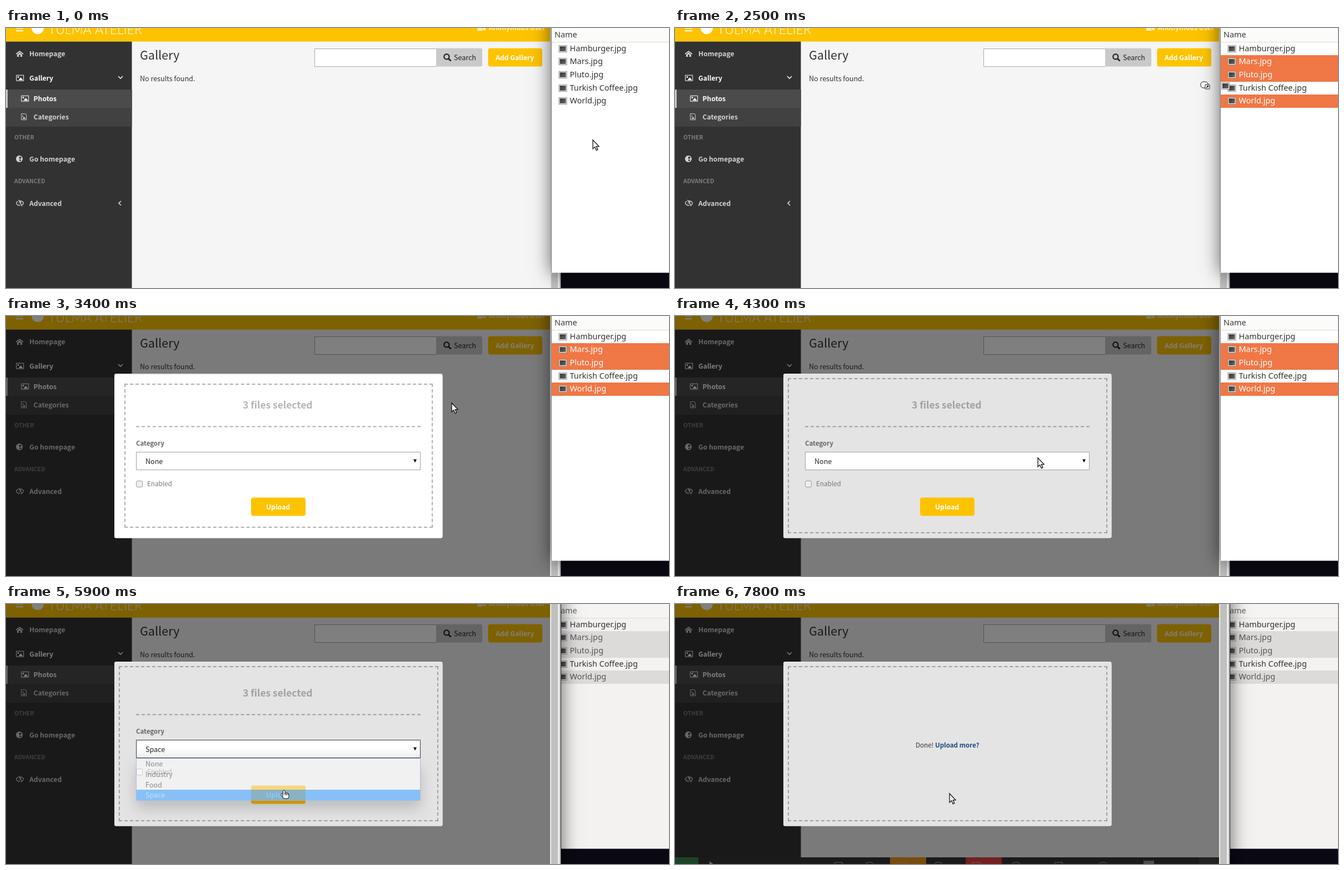
Recreate the animation shown at these times as an HTML page with a canvas. Size 1193 by 469 pixels, loop 8000 ms.

```html
<!DOCTYPE html>
<html lang="en">
<head>
<meta charset="utf-8">
<title>Gallery upload</title>
<style>
html, body { margin: 0; width: 100%; height: 100%; overflow: hidden; }
canvas { display: block; width: 1193px; height: 469px; }
</style>
</head>
<body>
<canvas id="stage" width="1193" height="469"></canvas>
<script>
const g = document.getElementById('stage').getContext('2d');
const LOOP = 8000, STEP = 100;
const UI = '"Noto Sans CJK JP", "Noto Sans CJK SC", "Noto Sans", sans-serif';
const DESKTOP = '"Noto Sans", "Open Sans", sans-serif';
const GOLD = '#fdc300';
const FILES = ['Hamburger', 'Mars', 'Pluto', 'Turkish Coffee', 'World'];
const PICKS = ['Mars', 'Pluto', 'World'];
const PICK_TIME = 600;
const FOCUS_SWITCH = 4500;

const clamp = v => Math.max(0, Math.min(1, v));
const ramp = (t, from, to) => clamp((t - from) / (to - from));
const mix = (a, b, k) => a + (b - a) * k;
const easeOut = k => Math.sin(k * Math.PI / 2);
const grey = v => `rgb(${v},${v},${v})`;
const fileY = i => Math.round(25.6 + i * 23.65);

// Pointer moves: start, end, x, y
const MOVES = [
  ...PICKS.map((name, i) =>
    [i * PICK_TIME, i * PICK_TIME + 500, 1050, fileY(FILES.indexOf(name)) + 7]),
  [1800, 2100, 1039, 80],
  [2300, 2500, 946, 97],
  [2500, 3000, 802, 157],
  [3400, 3600, 700, 215],
  [3800, 4300, 653, 256],
  [4300, 5100, 503, 334],
  [5500, 5700, 499, 336],
  [6300, 6500, 494, 342]
];

function pointerAt(t) {
  let x = 1056, y = 202;
  for (const [from, to, toX, toY] of MOVES) {
    const k = easeOut(ramp(t, from, to));
    x = mix(x, toX, k);
    y = mix(y, toY, k);
  }
  return { x: Math.round(x), y: Math.round(y) };
}

function box(x, y, w, h, color) {
  g.fillStyle = color;
  g.fillRect(x, y, w, h);
}

function round(x, y, w, h, r, fill, stroke) {
  g.beginPath();
  g.roundRect(x, y, w, h, r);
  paint(fill, stroke);
}

function paint(fill, stroke, width = 1) {
  g.lineWidth = width;
  if (fill) { g.fillStyle = fill; g.fill(); }
  if (stroke) { g.strokeStyle = stroke; g.stroke(); }
}

const frame = (x, y, w, h, color) => round(x + .5, y + .5, w - 1, h - 1, 0, null, color);

function disc(x, y, r, fill, stroke, width) {
  g.beginPath();
  g.arc(x, y, r, 0, 7);
  paint(fill, stroke, width);
}

function line(x0, y0, x1, y1, color, width = 1.5) {
  g.beginPath();
  g.moveTo(x0, y0);
  g.lineTo(x1, y1);
  paint(null, color, width);
}

// Dashes spread evenly, with a whole dash at both ends
function dashed(x0, y0, x1, y1, color) {
  const dash = 6, rest = Math.hypot(x1 - x0, y1 - y0) - dash;
  g.setLineDash([dash, rest / Math.round(rest / 10) - dash]);
  line(x0, y0, x1, y1, color, 2);
  g.setLineDash([]);
}

// Triangle or open chevron with its tip turned by the given quarter turns
function wedge(x, y, half, height, turns, fill, stroke) {
  at(x, y, () => {
    g.rotate(turns * Math.PI / 2);
    g.beginPath();
    g.moveTo(-half, height);
    g.lineTo(0, 0);
    g.lineTo(half, height);
    paint(fill, stroke, 1.7);
  });
}

function label(s, x, y, size, color, bold = false) {
  g.font = `${bold ? 700 : 400} ${size / (bold ? 1.15 : 1.117)}px ${UI}`;
  g.fillStyle = color;
  g.fillText(s, x, y);
}

function at(x, y, draw) {
  g.save();
  g.translate(x, y);
  draw();
  g.restore();
}

function fade(alpha, draw) {
  if (alpha <= 0) return;
  g.save();
  g.globalAlpha *= alpha;
  draw();
  g.restore();
}

function castShadow(color, blur, offsetY, draw) {
  g.save();
  g.shadowColor = color;
  g.shadowBlur = blur;
  g.shadowOffsetY = offsetY;
  draw();
  g.restore();
}

const icons = {
  home(c) {
    wedge(6.5, 2, 6.5, 5, 0, null, c);
    wedge(6.5, 4, 4.5, 4, 0, c);
    box(2, 8, 3.2, 4, c);
    box(7.8, 8, 3.2, 4, c);
  },
  image(c) {
    round(.7, 1.2, 13, 10, 0, null, c);
    disc(4, 4.5, 1.4, c);
    wedge(8.5, 5, 4, 5, 0, c);
  },
  file(c) {
    round(.7, .6, 9, 11, [0, 3, 0, 0], null, c);
    disc(3.4, 5, 1, c);
    wedge(5.5, 6, 3, 4, 0, c);
  },
  globe(c) {
    disc(6, 6, 6, c);
    disc(7.5, 4, 2, '#323232');
    disc(7.5, 8.5, 1.6, '#323232');
  },
  eye(c) {
    g.beginPath();
    g.ellipse(7, 6, 6.4, 4, 0, 0, 7);
    paint(null, c, 1.3);
    disc(7, 5.5, 2.4, c);
    line(3.5, .5, 10, 12, '#323232', 2.5);
    line(4.5, 0, 11, 11.5, c, 1.3);
  },
  search(c) {
    disc(5.8, 5.8, 4.6, null, c, 2.2);
    line(9, 9, 13.5, 13.5, c, 2.8);
  }
};

const icon = (name, x, y, color) => at(x, y, () => icons[name](color));

function sidebar() {
  const soft = '#d2d2d2', dim = '#7e7e7e', white = '#fff';
  box(0, 24.5, 226.5, 445, '#323232');
  box(0, 111, 226.5, 67, '#414141');
  box(0, 111, 226.5, 33, '#4b4b4b');
  box(0, 111, 3, 33, '#c8c8c8');
  const item = (name, s, y, color, indent = 0) => {
    icon(name, 18 + indent * 1.2, y - 11, color);
    label(s, 42 + indent, y, 14, color, true);
  };
  item('home', 'Homepage', 51, soft);
  item('image', 'Gallery', 95, white);
  item('image', 'Photos', 132, white, 7.5);
  item('file', 'Categories', 165, soft, 7.5);
  item('globe', 'Go homepage', 241, soft);
  item('eye', 'Advanced', 321, soft);
  label('OTHER', 15, 201, 12, dim, true);
  label('ADVANCED', 15, 280, 12, dim, true);
  wedge(206, 91, 4, 4, 2, null, '#eee');
  wedge(203, 316, 4, 4, -1, null, soft);
}

function header() {
  box(0, 0, 979, 24.5, GOLD);
  box(18, 0, 13, 1, '#fff');
  box(18, 4, 13, 2, '#fff');
  disc(57, 0, 11, '#fff');
  g.font = '300 23px Lato, sans-serif';
  g.fillStyle = '#fff';
  g.fillText('TULMA ATELIER', 76, 11);
  fade(.75, () => {
    box(848, 0, 9, 5, '#fff');
    line(858, 0, 863, 4, '#fff', 2);
    line(863, 0, 858, 4, '#fff', 2);
    label('Anonymous User', 869, 4, 14, '#fff', true);
  });
}

function debugBar() {
  box(0, 457, 979, 12, '#343434');
  box(0, 457, 42, 12, '#388a52');
  box(387, 457, 65, 12, '#f29a1c');
  box(523, 457, 65, 12, '#e84040');
  box(943, 457, 36, 12, '#444');
  wedge(69, 469, 5, 7, 1, '#ccc');
  for (let i = 0; i < 8; i++) {
    const x = 294 + 54 * i + 2 * i * i;
    round(x - 7, 466, 14, 9, i % 2 ? 5 : 1, null, '#bbb');
  }
  box(843, 463, 19, 6, '#999');
}

function page(t) {
  box(0, 0, 979, 469, '#f5f5f5');
  header();
  sidebar();
  label('Gallery', 241, 57, 24, '#333');
  label('No results found.', 241, 96, 14, '#333');
  box(555, 37, 219, 33, '#fff');
  frame(555, 37, 220, 33, '#a8a8a8');
  round(774, 36.5, 83, 33, [0, 3, 3, 0], '#c9c9c9');
  icon('search', 787, 46, '#222');
  label('Search', 806, 58, 14, '#222');
  round(867.5, 36.5, 97.5, 33, 4, GOLD);
  label('Add Gallery', 881, 58, 14, '#fff', true);
  if (t >= 7600) debugBar();
}

function form(t, hover, border) {
  label('3 files selected', 426, 167, 20, grey(mix(180, 160, hover)), true);
  dashed(234, 199.5, 746, 199.5, border);
  label('Category', 234, 234, 13.2, '#666', true);

  const focused = t >= FOCUS_SWITCH && t < 6900;
  const face = g.createLinearGradient(0, 245, 0, 278);
  face.addColorStop(.4, '#fff');
  face.addColorStop(1, focused ? '#f1f1f1' : '#fff');
  box(234, 245, 512, 33, face);
  frame(234, 245, 512, 33, focused ? '#3a3a3a' : '#a0a0a0');
  label(t >= 5800 ? 'Space' : 'None', 251, 267, 14, '#222');
  wedge(736, 264.5, 3, 6, 2, '#111');

  round(234.5, 297.5, 11, 11, 2, '#eee', '#999');
  label('Enabled', 254, 307, 13, '#777');

  round(441, 327.5, 98, 33, 4, t >= 5900 ? '#efae00' : GOLD);
  label('Upload', 468, 349, 14, '#fff', true);
}

function dropdown(pointer) {
  const x = 234, y = 278, w = 512, h = 77, rowHeight = 18.75;
  g.save();
  g.beginPath();
  g.rect(0, 0, 979, 469);
  g.rect(x, y, w, h);
  g.clip('evenodd');
  castShadow('rgba(0,0,0,.35)', 26, 14, () => box(x, y, w, h, '#fff'));
  g.restore();

  box(x, y, w, h, '#fff');
  const active = Math.max(0, Math.min(3, Math.floor((pointer.y - y - 1) / rowHeight)));
  ['None', 'Industry', 'Food', 'Space'].forEach((s, i) => {
    const top = y + 1 + i * rowHeight;
    if (i === active) box(x + 1, Math.round(top), w - 2, 19, '#1e90ff');
    label(s, 251, Math.round(top + 14), 14, i === active ? '#fff' : '#222');
  });
  frame(x, y, w, h, '#5a93d6');
}

function modal(t, pointer) {
  const hover = ramp(t, 3400, 3600);
  const border = grey(mix(176, 160, hover));
  fade(ramp(t, 2500, 2700), () => {
    box(0, 0, 979, 469, 'rgba(0,0,0,.5)');
    round(195, 104, 590.5, 296.5, 3, '#e8e8e8');
    round(195, 106, 590.5, 294.5, 3, grey(mix(255, 228, hover)));

    const inset = mix(18, 8, hover);
    const left = 196 + inset, right = 785 - inset, top = 105 + inset, bottom = 399 - inset;
    for (const y of [top, bottom]) dashed(left - 1, y, right + 1, y, border);
    for (const x of [left, right]) dashed(x, top - 1, x, bottom + 1, border);

    fade(1 - ramp(t, 7000, 7300), () => form(t, hover, border));
    fade(ramp(t, 7300, 7500), () => {
      label('Done!', 433, 259, 13, '#333');
      label('Upload more?', 468, 259, 13.3, '#1c4a80', true);
    });
    if (t >= FOCUS_SWITCH) fade(1 - .5 * Math.ceil(ramp(t, 5800, 6000) * 2), () => dropdown(pointer));
  });
}

function thumbnail(x, y) {
  box(x, y, 15, 13, '#888');
  box(x + 1, y + 1, 13, 11, '#fff');
  const dark = g.createLinearGradient(x, y, x + 13, y + 11);
  dark.addColorStop(0, '#2a2a2a');
  dark.addColorStop(1, '#666');
  box(x + 2, y + 2, 11, 9, dark);
}

// Window body; it starts off-stage so that only its visible edges cast a shadow
function windowBody(x, right, bottom, color, focused) {
  castShadow(focused ? 'rgba(0,0,0,.6)' : 'transparent', 32, 2,
    () => box(x, -80, right - x, bottom + 80, color));
}

function fileWindow(t, focused) {
  const text = (s, x, y, color) => {
    g.font = `14.4px ${DESKTOP}`;
    g.fillStyle = color;
    g.fillText(s, x, y);
  };
  windowBody(981, 1280, 441.5, focused ? '#fff' : '#f3f2f1', focused);
  box(981, 0, 212, 25, focused ? '#fbfbfa' : '#f5f4f3');
  box(981, 25, 212, 1, '#dcdad8');
  text('Name', 987, 17, focused ? '#3c3c3c' : '#666');
  FILES.forEach((name, i) => {
    const y = fileY(i), pick = PICKS.indexOf(name);
    const picked = pick >= 0 && t >= PICK_TIME * (pick + 1);
    if (picked) box(981, y, 212, 24, focused ? '#f07746' : '#dddbda');
    thumbnail(994.5, y + 5);
    text(name + '.jpg', 1014.5, y + 16, !picked ? '#303030' : focused ? '#fff' : '#555');
  });
  box(981, 0, 1, 441, '#8a8a8a');
}

function browserWindow(t, focused, pointer) {
  windowBody(-80, 999, 600, '#ececec', focused);
  page(t);
  modal(t, pointer);
  box(981, 0, 12, 469, '#c0c0c0');
  box(996, 0, 2, 469, '#bcbcbc');
  box(998, 0, 1, 469, '#333');
}

const ARROW = new Path2D('M0 0v16l3.6-3.4 2.6 6 2.6-1.2-2.5-5.8h4.7z');

function arrow() {
  g.fillStyle = '#fff';
  g.strokeStyle = '#111';
  g.lineWidth = 1.3;
  g.fill(ARROW);
  g.stroke(ARROW);
}

function hand() {
  round(-4, 6, 7, 5, 2, '#fff', '#111');
  round(-1, 5, 11, 10, 3, '#fff', '#111');
  round(-.5, 0, 3.5, 9, 1.7, '#fff', '#111');
  box(0, 7, 6, 5, '#fff');
  for (let x = 3; x < 9; x += 2.5) line(x, 6, x, 9, '#111', 1);
}

function fist() {
  round(0, 0, 13, 11, 4.5, '#fff', '#111');
  round(8, 5, 8, 8, 1, '#fff', '#111');
  line(10, 11, 14, 7, '#111', 1.3);
  wedge(14, 7, 2.5, 2.5, .5, '#111');
}

function cursor(t, { x, y }) {
  const dragging = t >= 2400 && t < 3000;
  const pressing = t >= 5800 && t < 7100;
  if (dragging) thumbnail(x + 37, y + 1);
  at(x, y, dragging ? fist : pressing ? hand : arrow);
}

function render(t) {
  const pointer = pointerAt(t);
  const browserFocused = t >= FOCUS_SWITCH;
  box(0, 0, 1193, 469, '#0a0812');
  const layers = [
    () => browserWindow(t, browserFocused, pointer),
    () => fileWindow(t, !browserFocused)
  ];
  if (browserFocused) layers.reverse();
  layers.forEach(draw => draw());
  cursor(t, pointer);
}

const start = performance.now();
function tick() {
  const t = (performance.now() - start) % LOOP;
  render(Math.floor(t / STEP) * STEP);
  requestAnimationFrame(tick);
}
tick();
</script>
</body>
</html>
```
